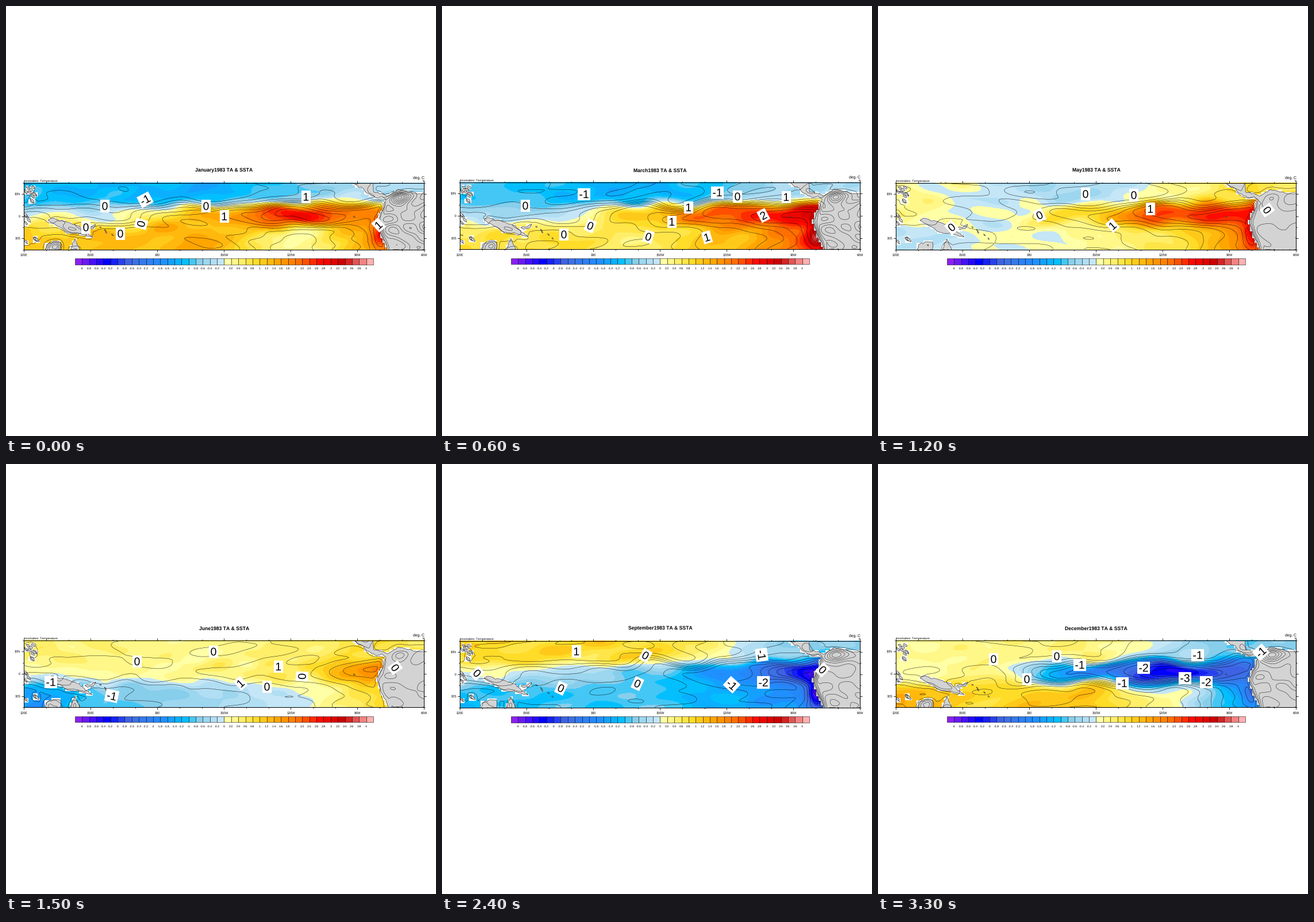
A matplotlib script for the animation above (3.6 s loop, 748 by 748 pixels).

```python
import numpy as np
import matplotlib.pyplot as plt
from matplotlib.animation import FuncAnimation
from matplotlib.colors import LinearSegmentedColormap
from matplotlib.patches import PathPatch, Polygon, Rectangle
from matplotlib.path import Path
from matplotlib.textpath import TextPath
from matplotlib.transforms import Affine2D

plt.rcParams.update({"font.family": "Liberation Sans", "text.hinting": "none",
                     "text.kerning_factor": 6, "contour.negative_linestyle": "solid"})

SIZE = 748
L, R, T, B = 31.5, 727.5, 307.5, 423.5
DEG = (R - L) / 180
COAST = 655
xs, ys = np.linspace(L, R, 349), np.linspace(T, B, 59)
X, Y = np.meshgrid(xs, ys)
LAT = ((T + B) / 2 - Y) / DEG
U = np.clip((X - L) / (COAST - L), 0, 1)

# ---------------------------------------------------------------- colours
cold = LinearSegmentedColormap.from_list("cold", [
    (0, "#8a20f0"), (0.2, "blue"), (0.36, "royalblue"), (0.6, "dodgerblue"),
    (0.75, "deepskyblue"), (0.85, "skyblue"), (1, "#c4e6f6")])
warm = LinearSegmentedColormap.from_list("warm", [
    (0, "#ffffa6"), (0.2, "#ffdc28"), (0.35, "orange"), (0.5, "#ff7000"),
    (0.65, "#ff0a00"), (0.8, "#cd0000"), (0.85, "#d42222"), (1, "#ffb0b0")])
COLORS = [*cold(np.linspace(0, 1, 21)), *warm(np.linspace(0, 1, 21))]
TICKS = np.round(np.arange(-20, 21) * 0.2, 1)
LEVELS = np.concatenate([[-20], TICKS, [20]])


# ---------------------------------------------------------------- fields
def curve(keys):
    """Eased curve through values spaced evenly from the west edge to the coast."""
    p = U * (len(keys) - 1)
    i = np.minimum(p.astype(int), len(keys) - 2)
    ease = (1 - np.cos(np.pi * (p - i))) / 2
    v = np.array(keys)
    return v[i] + (v[i + 1] - v[i]) * ease


def waves(seed, lx, ly, n=14):
    rng = np.random.default_rng(seed)
    out = np.zeros_like(X)
    for _ in range(n):
        kx, ky = 2 * np.pi / (np.array([lx, ly]) * rng.uniform(0.6, 1.7, 2))
        kx *= rng.choice([-1, 1])
        out += np.sin(kx * X + ky * Y + rng.uniform(0, 2 * np.pi))
    return out / np.sqrt(n / 2)


def bump(x, y, rx, ry):
    return np.exp(-((X - x) / rx)**2 - ((Y - y) / ry)**2)


def sigmoid(v):
    return 1 / (1 + np.exp(-v))


def ocean(north, tongue, south, coast, sway):
    """Three latitude bands that melt into each other, and a patch by the coast."""
    lat = LAT + sway
    up, down = sigmoid((lat - 3.6 - 2 * U) / 1.2), sigmoid((-3.8 - lat) / 1.3)
    sea = (up * curve(north) + down * curve(south)
           + np.maximum(0, 1 - up - down) * curve(tongue))
    return sea + (coast - sea) * bump(652, 398, 17, 26)


def month(name, rough, north, tongue, south, coast, labels):
    seed = len(name) * 10 + ord(name[0])
    bands = north, tongue, south, coast
    return dict(name=name, rough=rough, labels=labels,
                sst=ocean(*bands, 0.7 * waves(seed, 120, 90)) + 0.1 * waves(seed + 1, 130, 50),
                air=0.7 * ocean(*bands, 0.8 * waves(seed + 2, 130, 120))
                + 0.07 * waves(seed + 3, 170, 45))


def between(name, a, b):
    """A month halfway between two others."""
    labels = []
    for lab in a["labels"][::2] + b["labels"][1::2]:
        if all(np.hypot(lab[1] - o[1], lab[2] - o[2]) > 32 for o in labels):
            labels.append(lab)
    mid = {k: (a[k] + b[k]) / 2 for k in ("rough", "sst", "air")}
    return dict(mid, name=name, labels=labels)


# Labels are text, x, y and, where they lean, an angle.
jan = month("January", 1.0, north=(-1.1, -1.3, -0.4), tongue=(0, 0, 1.3, 2.9, 1.8),
            south=(1.1, 1.2, 1.4, 0.2, 1.4), coast=2.7, labels=[
    ("0", 172, 348), ("-1", 242, 337, 28), ("0", 348, 348), ("1", 380, 366),
    ("1", 522, 332), ("0", 139, 385), ("0", 199, 396), ("0", 235, 379, 75),
    ("1", 648, 381, 42)])
mar = month("March", 0.8, north=(-0.9, -1.3, -0.4), tongue=(-0.4, -0.4, 1.2, 2.5, 3.1),
            south=(0.7, 0.8, 0.5, 1.2, 2.3), coast=3.5, labels=[
    ("-1", 247, 328), ("0", 145, 348), ("-1", 479, 325), ("0", 514, 332),
    ("1", 599, 333), ("1", 429, 351), ("1", 400, 376), ("2", 559, 365, 28),
    ("0", 258, 383, -22), ("0", 212, 398), ("0", 359, 402, -18), ("1", 461, 403, 16)])
may = month("May", 0.3, north=(0.2, -0.4, 0.7), tongue=(0.4, -0.1, 0.9, 2.5, 2.8),
            south=(-0.3, 0, 0.1, 0.6, 1.8), coast=2.9, labels=[
    ("0", 361, 327), ("0", 445, 329), ("1", 474, 353), ("0", 281, 364, 25),
    ("1", 408, 382, 42), ("0", 128, 385, 40), ("0", 677, 355, -55)])
jul = month("July", 0.5, north=(0.7, 0.9, 0.7), tongue=(-0.3, 0.5, -0.2, -1.3, 1.2),
            south=(-2.9, -1.6, -1.1, -0.8, -0.3), coast=-1.1, labels=[
    ("0", 64, 329), ("0", 228, 344), ("0", 408, 338), ("0", 515, 370, 88),
    ("0", 292, 388), ("0", 454, 388), ("0", 649, 388, 45), ("-1", 78, 380),
    ("-1", 146, 390, 25), ("-1", 184, 404, -12)])
sep = month("September", 0.5, north=(0.9, 0.9, -0.7), tongue=(0.1, -0.3, -0.8, -1.8, -3.7),
            south=(-1.1, -1, -0.9, -1.3, -1.9), coast=-3.9, labels=[
    ("1", 234, 326), ("0", 354, 333, -30), ("0", 61, 364, -45), ("0", 207, 390, -25),
    ("0", 340, 382, -25), ("-1", 504, 384, -42), ("-1", 556, 332, -82),
    ("-2", 559, 380), ("0", 662, 358, -45)])
octo = month("October", 0.5, north=(0.8, 1.3, -0.7), tongue=(0.7, 0, -1.9, -3.1, -3.7),
             south=(0.2, -0.4, 0, -1.1, -1.9), coast=-4, labels=[
    ("0", 110, 371, 15), ("0", 168, 381, -38), ("0", 267, 353), ("-1", 303, 360, 10),
    ("0", 408, 334, 12), ("-1", 446, 350), ("-1", 602, 327, 15), ("-2", 543, 353),
    ("0", 342, 389, -25), ("-1", 495, 390, -45), ("-2", 576, 396, -48)])
dec = month("December", 0.6, north=(0.2, 0.4, -0.8), tongue=(-0.1, 0.4, -1.9, -3.6, -2.6),
            south=(1.4, 0.9, 1.2, 0.2, -1.5), coast=-2.4, labels=[
    ("0", 201, 340), ("0", 311, 335), ("-1", 351, 350), ("0", 259, 375),
    ("-2", 462, 355), ("-1", 425, 382), ("-3", 534, 373), ("-2", 571, 380),
    ("-1", 556, 333), ("-1", 666, 328, 42)])

YEAR = [jan, between("February", jan, mar), mar, between("April", mar, may),
        may, between("June", may, jul), jul, between("August", jul, sep),
        sep, octo, between("November", octo, dec), dec]

# ---------------------------------------------------------------- land
LANDS = [
    # the Americas
    [(601, 306), (622, 318), (627, 325), (645, 334), (654, 331), (661, 337),
     (656, 355), (651, 362), (646, 376), (649, 386), (665, 424), (729, 424),
     (729, 327), (712, 326), (683, 319), (664, 331), (656, 327), (640, 324),
     (638, 306)],
    # New Guinea and New Britain
    [(73, 373), (80, 369), (100, 374), (125, 382), (150, 402), (131, 397),
     (108, 394), (88, 382)],
    [(137, 386), (147, 385), (156, 380), (152, 387), (142, 389)],
    # northern Australia
    [(68, 424), (71, 415), (82, 410), (95, 411), (95, 424)],
    [(112, 424), (120, 405), (128, 424)],
]


def crinkle(pts):
    """Breaks long straight coasts into small uneven steps."""
    rng = np.random.default_rng(3)
    out = []
    for p, q in zip(np.array(pts, float), np.array(pts[1:] + pts[:1], float)):
        n = max(1, int(np.hypot(*(q - p)) / 3))
        out += [tuple(p + (q - p) * k / n + (rng.normal(0, 0.6, 2) if k else 0))
                for k in range(n)]
    return out


def islets(x, y, dx, dy, n, size, seed):
    rng = np.random.default_rng(seed)
    a = np.linspace(0, 2 * np.pi, 9)[:-1]
    for _ in range(n):
        r = size * rng.uniform(0.6, 1.5, 8)
        cx, cy = x + dx * rng.uniform(-1, 1), y + dy * rng.uniform(-1, 1)
        yield list(zip(cx + r * np.cos(a), cy + r * np.sin(a + 0.7)))


shapes = [crinkle(p) for p in LANDS]
for k, (x, y, dx, dy) in enumerate([(41, 318, 7, 8), (50, 334, 6, 7),
                                    (37, 374, 4, 12), (46, 408, 12, 5)]):
    shapes += islets(x, y, dx, dy, 5, 2.8, k)
specks = [s for k in range(5)
          for s in islets(163 + 7 * k, 385 + 4.5 * k, 3, 3, 1, 1.3, 20 + k)]
specks += islets(606, 367, 0, 0, 1, 1.2, 30)

PX, PY = np.meshgrid(np.arange(696) + L + 0.5, np.arange(116) + T + 0.5)
dots = np.column_stack([PX.ravel(), PY.ravel()])
mask = np.any([Path(s + s[:1]).contains_points(dots) for s in shapes], axis=0)
mask = mask.reshape(PX.shape)
blocks = mask.reshape(29, 4, 174, 4).any(axis=(1, 3))


def blur(v):
    return np.convolve(np.pad(v, 3, mode="edge"), np.ones(7) / 7, "valid")


land = np.pad(mask[::2, ::2].astype(float), ((0, 1), (0, 1)), mode="edge")
for axis in (0, 1):
    land = np.apply_along_axis(blur, axis, land)
hills = 0.3 * waves(11, 75, 50) + 1.6 * bump(684, 332, 14, 9)
for m in YEAR:
    m["air"] = m["air"] * (1 - 0.7 * land) + m["rough"] * land * hills

# ---------------------------------------------------------------- stage
fig = plt.figure(figsize=(SIZE / 72, SIZE / 72), dpi=72, facecolor="white")
ax = fig.add_axes([0, 0, 1, 1])
ax.set_xlim(0, SIZE)
ax.set_ylim(SIZE, 0)
ax.axis("off")
ax.set_autoscale_on(False)


def line(x, y):
    ax.plot(x, y, color="black", lw=0.8, zorder=6, solid_capstyle="butt")


def write(x, y, s, size, ha="center"):
    ax.text(x, y, s, size=size, ha=ha, va="baseline", zorder=6)


frame = Rectangle((L, T), R - L, B - T, fc="none", ec="black", lw=1, zorder=6)
ax.add_patch(frame)

fringe = np.ones(blocks.shape + (4,))
fringe[..., 3] = blocks
ax.imshow(fringe, extent=(L, R, B, T), interpolation="nearest", aspect="auto", zorder=2)
for s in shapes + specks:
    shore = Polygon(s, fc="#d3d3d3", ec="black", lw=0.5, zorder=3)
    ax.add_patch(shore)
    shore.set_clip_path(frame)

for d in range(0, 181, 10):
    x, n = L + d * DEG, 4 if d % 30 == 0 else 2
    line([x, x], [T - n, T])
    line([x, x], [B, B + n])
for d in range(-15, 16, 5):
    y, n = (T + B) / 2 - d * DEG, 4 if d % 10 == 0 else 2
    line([L - n, L], [y, y])
    line([R, R + n], [y, y])
for k, s in enumerate(["120E", "150E", "180", "150W", "120W", "90W", "60W"]):
    write(L + 30 * k * DEG, 435.2, s, 5.5)
for d, s in [(10, "10N"), (0, "0"), (-10, "10S")]:
    write(25, 367.5 - d * DEG, s, 5.5, "right")

write(31, 305.8, "Anomalies: Temperature", 5.4, "left")
write(728, 305.8, "K", 5.4, "right")
write(728, 300.2, "deg. C", 6.8, "right")

CELL = 519 / 42
for i, c in enumerate(COLORS):
    ax.add_patch(Rectangle((120 + i * CELL, 439.3), CELL, 10.2, fc=c, ec="black", lw=0.5))
for i, v in enumerate(TICKS):
    write(120 + (i + 1) * CELL, 458.2, f"{v + 0:g}", 5.2)

title = fig.text(379.5 / SIZE, 0, "", size=8.65, weight="bold", ha="center", va="baseline")
live = []


def tag(s, x, y, turn=0):
    glyph = TextPath((0, 0), s, size=19.5, prop="Liberation Sans")
    box = glyph.get_extents()
    cx, cy = (box.x0 + box.x1) / 2, (box.y0 + box.y1) / 2
    place = (Affine2D().translate(-cx, -cy).rotate_deg(turn)
             .scale(1, -1).translate(x, y) + ax.transData)
    card = Rectangle((box.x0 - 3.5, box.y0 - 3.8), box.width + 7, box.height + 7.6,
                     fc="white", ec="none", zorder=7)
    ink = PathPatch(glyph, fc="black", ec="none", zorder=8)
    for p in (card, ink):
        p.set_transform(place)
        live.append(ax.add_patch(p))


def draw(i):
    while live:
        live.pop().remove()
    m = YEAR[i]
    # Titles without descenders are shorter, which lets the map sit higher.
    deep = any(c in m["name"] for c in "gpy")
    lift = 0 if deep else 0.6
    ax.set_ylim(SIZE + lift, lift)
    title.set_text(m["name"] + "1983 TA & SSTA")
    title.set_y(1 - (288.3 if deep else 289.1) / SIZE)
    live.append(ax.contourf(xs, ys, m["sst"], levels=LEVELS, colors=COLORS, zorder=1))
    live.append(ax.contour(xs, ys, m["air"], levels=np.arange(-20, 21) * 0.25,
                           colors="black", linewidths=0.45, zorder=4))
    for lab in m["labels"]:
        tag(*lab)
    return live


anim = FuncAnimation(fig, draw, frames=12, interval=300, repeat=True, blit=False)
plt.show()
```
